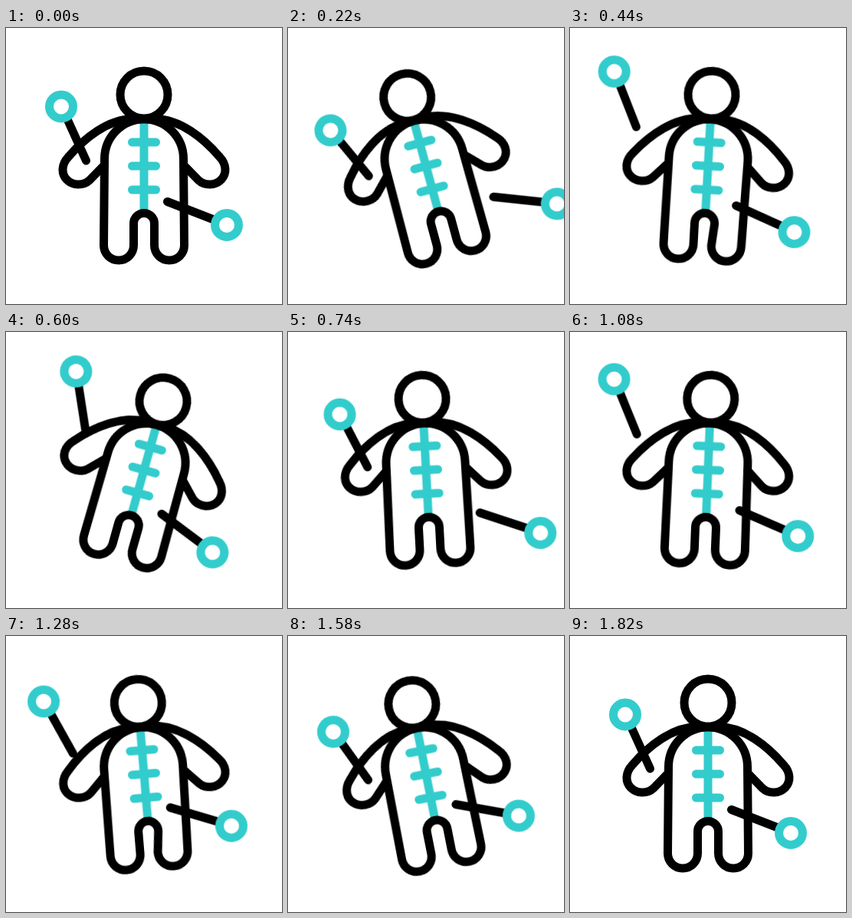
An HTML page that plays this animation: 360 px wide and 360 px high, repeating every 2400 ms.

```html
<!DOCTYPE html>
<html lang="en">
<head>
<meta charset="utf-8">
<title>Doll with pins</title>
<style>
  html, body { margin: 0; width: 100%; height: 100%; overflow: hidden; background: #fff; }
  svg { display: block; width: 100vw; height: 100vh; }

  .ink, .teal { fill: none; stroke-width: 11; stroke-linecap: round; stroke-linejoin: round; }
  .ink { stroke: #000; }
  .teal { stroke: #33cccc; }

  .doll, .pin, .torso { animation: 2400ms cubic-bezier(.37, 0, .63, 1) infinite; }
  .doll { transform-origin: 180px 180px; animation-name: sway; }
  .left { --out: translate(-21px, -39.5px); animation-name: stab-left; }
  .right { --out: translate(45.3px, 15.9px); animation-name: stab-right; }
  .torso { animation-name: twitch; }

  @keyframes sway {
    0% { transform: rotate(0deg); }
    13.1% { transform: rotate(-19deg); }
    22.5% { transform: rotate(18deg); }
    37.92% { transform: rotate(-19deg); }
    48.17% { transform: rotate(8deg); }
    58.96% { transform: rotate(-19deg); animation-timing-function: linear; }
    75.83%, 100% { transform: rotate(0deg); }
  }
  @keyframes stab-left {
    0%, 10% { transform: translate(0, 0); }
    19.1% { transform: var(--out); }
    32.1% { transform: translate(0, 0); }
    48.2% { transform: var(--out); }
    62.1%, 100% { transform: translate(0, 0); }
  }
  @keyframes stab-right {
    0% { transform: translate(0, 0); }
    10.4% { transform: var(--out); }
    21.7% { transform: translate(0, 0); }
    34.6% { transform: var(--out); }
    50.8%, 100% { transform: translate(0, 0); }
  }
  /* the right leg pulls inward as its pin lands */
  @keyframes twitch {
    0%, 14%, 26%, 47%, 60%, 100% {
      d: path("M128.5 171A51.5 52 0 0 1 231.5 171L232.5 283.5A19.5 19.5 0 0 1 193.5 283.5L193.5 255A13.5 13.5 0 0 0 166.5 255L166.5 283.5A19.5 19.5 0 0 1 127.5 283.5Z");
    }
    19.5%, 53% {
      d: path("M128.5 171A51.5 52 0 0 1 231.5 171L228.5 283.5A19.5 19.5 0 0 1 189.5 283.5L192.5 255A13 13.5 0 0 0 166.5 255L166.5 283.5A19.5 19.5 0 0 1 127.5 283.5Z");
    }
  }
</style>
</head>
<body>
<svg viewBox="0 0 360 360">
  <defs>
    <path id="arm" d="M165 118.5C133 119 102 144 81.5 168C72 178 72 190 79 197.5C87 206 101 206 109 198.5L128 179"/>
  </defs>
  <g class="doll">
    <path class="teal" d="M180 123V236M164.5 149H195.5M164.5 180H195.5M164.5 211H195.5"/>
    <g class="ink">
      <circle cx="180" cy="87" r="31"/>
      <use href="#arm"/>
      <use href="#arm" transform="matrix(-1 0 0 1 360 0)"/>
      <path class="torso" d="M128.5 171A51.5 52 0 0 1 231.5 171L232.5 283.5A19.5 19.5 0 0 1 193.5 283.5L193.5 255A13.5 13.5 0 0 0 166.5 255L166.5 283.5A19.5 19.5 0 0 1 127.5 283.5Z"/>
    </g>
    <g class="pin left">
      <path class="ink" d="M104.5 173L80 119"/>
      <circle class="teal" cx="72" cy="102.5" r="15.5"/>
    </g>
    <g class="pin right">
      <path class="ink" d="M210.5 226.5L271 250"/>
      <circle class="teal" cx="288" cy="257" r="15.5"/>
    </g>
  </g>
</svg>
</body>
</html>
```
